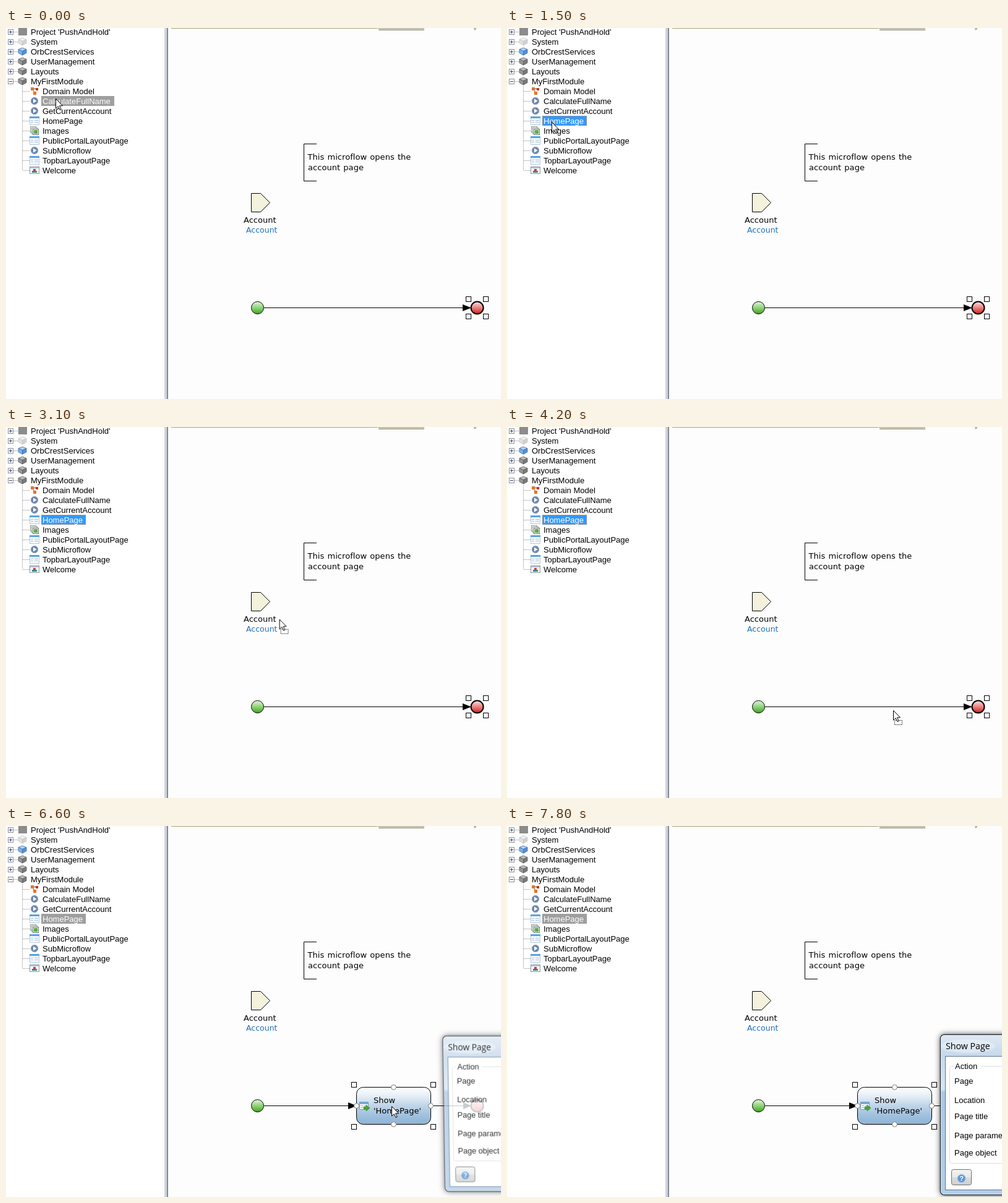
Animation of 800 by 600 pixels, one loop 8000 ms. Source, as an HTML page:

```html
<!DOCTYPE html>
<html lang="en">
<head>
<meta charset="utf-8">
<title>Drag a page into a flow</title>
<style>
html, body { margin: 0; width: 100%; height: 100%; overflow: hidden; background: #fff; }
svg { display: block; width: 800px; height: 600px; }
.tree, .dialog { font: 13px "Liberation Sans", Arial, sans-serif; }
.flow { font: 13px "DejaVu Sans", Verdana, sans-serif; }
.title { font: 14.2px "Open Sans", "Noto Sans", sans-serif; }
.sel text { fill: #fff; }
.dots { stroke: #8c8c8c; stroke-dasharray: 1 1; fill: none; shape-rendering: crispEdges; }
.handle { fill: #fff; stroke: #000; }
.knob { fill: #fff; stroke: #777; }

.sel-old, .sel-on, .sel-off, .before, .after, .marks, .arrow, .ghost, .deny, .dialog, .cursor {
  animation: 8s step-end infinite;
}
.sel-old { animation-name: selOld; }
.sel-on { animation-name: selOn; }
.sel-off, .marks { animation-name: settled; }
.before { animation-name: before; }
.after { animation-name: after; }
.arrow { animation-name: arrow; }
.ghost { animation-name: ghost; }
.deny { animation-name: deny; }
.dialog { animation-name: dialog; transform-origin: 917px 412px; }
.cursor { animation-name: path; }

@keyframes selOld { 0% { opacity: 1 } 10%, 100% { opacity: 0 } }
@keyframes selOn { 0% { opacity: 0 } 10% { opacity: 1 } 62.5%, 100% { opacity: 0 } }
@keyframes settled { 0% { opacity: 0 } 62.5%, 100% { opacity: 1 } }
@keyframes before { 0% { opacity: 1 } 61.25%, 100% { opacity: 0 } }
@keyframes after { 0% { opacity: 0 } 61.25%, 100% { opacity: 1 } }
@keyframes arrow { 0% { opacity: 1 } 25% { opacity: 0 } 33.75% { opacity: 1 } 97.5%, 100% { opacity: 0 } }
@keyframes ghost { 0% { opacity: 0 } 33.75% { opacity: 1 } 61.25%, 100% { opacity: 0 } }
@keyframes deny { 0% { opacity: 0 } 25% { opacity: 1 } 33.75%, 100% { opacity: 0 } }
@keyframes dialog {
  0% { opacity: 0; transform: none }
  81.25% { opacity: .4; transform: matrix(.945, 0, .027, .945, 0, 0) }
  82.5% { opacity: .8; transform: matrix(.97, 0, .015, .97, 0, 0) }
  83.75% { opacity: .95; transform: matrix(.99, 0, .005, .99, 0, 0) }
  85%, 100% { opacity: 1; transform: none }
}
@keyframes path {
  0% { transform: translate(80px, 114px) }
  1.25% { transform: translate(84px, 133px) }
  2.5% { transform: translate(92px, 158px) }
  3.75% { transform: translate(95px, 165px) }
  5% { transform: translate(93px, 152px) }
  13.75% { transform: translate(93px, 152px); animation-timing-function: steps(4, end) }
  18.75% { transform: translate(72px, 152px) }
  25% { transform: translate(56px, 156px) }
  26.25% { transform: translate(31px, 168px) }
  27.5% { transform: translate(44px, 182px) }
  28.75% { transform: translate(88px, 196px); animation-timing-function: steps(5, end) }
  35% { transform: translate(370px, 252px); animation-timing-function: steps(7, end) }
  43.75% { transform: translate(537px, 389px) }
  45% { transform: translate(537px, 389px); animation-timing-function: steps(6, end) }
  52.5% { transform: translate(624px, 458px) }
  56.25% { transform: translate(624px, 453px) }
  68.75% { transform: translate(625px, 453px) }
  70% { transform: translate(623px, 453px) }
  90% { transform: translate(623px, 453px); animation-timing-function: steps(4, end) }
  95%, 100% { transform: translate(753px, 471px) }
}
</style>
</head>
<body>
<svg viewBox="0 0 800 600">
  <defs>
    <linearGradient id="green" x2="0" y2="1">
      <stop offset="0" stop-color="#e2f5da"/><stop offset=".5" stop-color="#8fd37a"/><stop offset="1" stop-color="#3fa31c"/>
    </linearGradient>
    <linearGradient id="red" x2="0" y2="1">
      <stop offset="0" stop-color="#fbe3e3"/><stop offset=".5" stop-color="#ec8080"/><stop offset="1" stop-color="#d21c1c"/>
    </linearGradient>
    <linearGradient id="blue" x2="0" y2="1">
      <stop offset="0" stop-color="#fff"/><stop offset=".25" stop-color="#e4edf6"/>
      <stop offset=".5" stop-color="#bfd4e8"/><stop offset=".75" stop-color="#a1c1de"/><stop offset="1" stop-color="#8db3d5"/>
    </linearGradient>
    <linearGradient id="glass" x2="0" y2="1">
      <stop offset="0" stop-color="#dfe9f3"/><stop offset=".13" stop-color="#c6d9ec"/>
      <stop offset=".34" stop-color="#d6e5f3"/><stop offset=".36" stop-color="#abc8e4"/><stop offset="1" stop-color="#b3cee8"/>
    </linearGradient>
    <linearGradient id="button" x2="0" y2="1">
      <stop offset="0" stop-color="#f3f3f3"/><stop offset=".5" stop-color="#e9e9e9"/>
      <stop offset=".52" stop-color="#dcdcdc"/><stop offset="1" stop-color="#cfcfcf"/>
    </linearGradient>
  </defs>

  <rect width="800" height="600" fill="#fff"/>
  <rect x="262" width="538" height="600" fill="#fdfdfd"/>
  <rect x="256" width="5" height="600" fill="#d0d3de"/>
  <rect x="260" width="2" height="600" fill="#85878e"/>
  <path d="M267 0H600V1H267Z" fill="#a3a17c"/>
  <path d="M600 0H676V4H604Z" fill="#c4c2b0"/>
  <path d="M602 3.5H676" stroke="#a5a392"/>
  <path d="M756 0h4v2l-3 2z" fill="#b7b590"/>

  <g class="tree" id="tree"></g>

  <g class="flow">
    <path d="M502 187.5H481.5V247.5H502" fill="none" stroke="#000"/>
    <g word-spacing="1" letter-spacing=".05">
      <text x="487.5" y="213">This microflow opens the</text><text x="488" y="230">account page</text>
    </g>
    <path d="M396.5 267.5h15l15 15l-15 15h-15z" fill="#f4f2dc" stroke="#000"/>
    <text x="384" y="315">Account</text>
    <text x="388" y="331" font-size="12.5" fill="#1f70b8">Account</text>
    <circle cx="406.5" cy="452.5" r="10" fill="url(#green)" stroke="#000"/>
    <g class="before">
      <path d="M417 452.5H740" stroke="#000"/><path d="M738 447l14 5.5l-14 5.5z"/>
    </g>
    <g class="after">
      <path d="M417 452.5H555M687 452.5H740" stroke="#000"/>
      <path d="M553 447l14 5.5l-14 5.5zM739 447l13 5.5l-13 5.5z"/>
      <rect x="566.5" y="422.5" width="120" height="60" rx="11" fill="url(#blue)" stroke="#000"/>
      <path d="M571.5 446.5h14v12h-14z" fill="#fff" stroke="#7d96ad"/>
      <path d="M572 447h13v3h-13z" fill="#6fb1e6"/>
      <path d="M573 452.5h4m2 0h5M573 455.5h4" stroke="#8fa3b5"/>
      <path d="M578 454h4v-3l6 5l-6 5v-3h-4z" fill="#45a83a" stroke="#2c7d25" stroke-width=".6"/>
      <text x="594" y="448">Show</text><text x="594" y="465">'HomePage'</text>
    </g>
    <circle cx="761.5" cy="452.5" r="10" fill="url(#red)" stroke="#000" stroke-width="2"/>
    <g class="before" id="endMarks"></g>
    <g class="marks" id="stepMarks"></g>
  </g>

  <g class="dialog">
    <rect x="700.5" y="337.5" width="434" height="259" rx="6" fill="url(#glass)" stroke="#1f2a36" stroke-width="1.4"
      style="filter: drop-shadow(0 0 5px rgba(0,0,0,.65))"/>
    <rect x="701.5" y="338.5" width="432" height="257" rx="5" fill="none" stroke="#fff" stroke-opacity=".7"/>
    <ellipse cx="745" cy="356" rx="44" ry="11" fill="#fff" opacity=".3"/>
    <rect x="708.5" y="372.5" width="418" height="216" fill="#fff" stroke="#5f7690"/>
    <rect x="715.5" y="388.5" width="404" height="157" rx="3" fill="none" stroke="#dcdcdc"/>
    <rect x="721" y="380" width="44" height="16" fill="#fff"/>
    <text class="title" x="709" y="361">Show Page</text>
    <g id="labels"></g>
    <rect x="718.5" y="555.5" width="32" height="25" rx="3" fill="url(#button)" stroke="#707070"/>
    <circle cx="734.5" cy="570" r="6.5" fill="#5d97d3" stroke="#a9c4e0"/>
    <text x="734.5" y="574" text-anchor="middle" font-size="11" font-weight="bold" fill="#fff">?</text>
  </g>

  <g class="cursor">
    <g class="ghost">
      <rect x="2" y="16" width="13" height="8" fill="#fff"/>
      <rect x="2.5" y="16.5" width="12" height="7" fill="none" stroke="#000" stroke-dasharray="1 1" stroke-dashoffset=".5" shape-rendering="crispEdges"/>
    </g>
    <path class="arrow" d="M.5 .5V16.2L4.2 12.7L7 18.5L9.2 17.5L6.6 11.8H11.5Z" fill="#fff" stroke="#000"/>
    <g class="deny" fill="none">
      <path d="M-5.5-5.5L5.5 5.5" stroke="#000" stroke-width="3"/>
      <circle r="8" stroke="#000" stroke-width="4"/>
      <circle r="8" stroke="#fff" stroke-width="1.6"/>
      <path d="M-5.5-5.5L5.5 5.5" stroke="#fff" stroke-width="1.4"/>
    </g>
  </g>
</svg>
<script>
const put = (id, html) => { document.getElementById(id).innerHTML = html; };
const label = (x, y, s) => `<text x="${x}" y="${y}">${s}</text>`;
const rect = (x, y, w, h, fill, stroke = 'none') =>
  `<rect x="${x}" y="${y}" width="${w}" height="${h}" fill="${fill}" stroke="${stroke}"/>`;
const line = (d, color) => `<path d="${d}" fill="none" stroke="${color}"/>`;

// Icons are drawn around the vertical centre of their row.
const cube = (top, left, right, edge) => y => `<g transform="translate(26.5 ${y})" stroke="${edge}" stroke-width=".8">
  <path d="M0-6L6.5-3.5L0-.5L-6.5-3.5Z" fill="${top}"/><path d="M-6.5-3.5L0-.5V6L-6.5 2.5Z" fill="${left}"/>
  <path d="M6.5-3.5L0-.5V6L6.5 2.5Z" fill="${right}"/></g>`;
const pale = cube('#f2f2f2', '#e2e2e2', '#d2d2d2', '#c4c4c4');
const azure = cube('#b5d4f5', '#7eb0ea', '#5590d6', '#3b6fb0');
const grey = cube('#c0c0c0', '#989898', '#7a7a7a', '#5c5c5c');
const badge = y => rect(20, y - 6, 14, 12, '#8c8c8c');
const model = y => line(`M43 ${y - 3.5}H49.5M43.5 ${y - 3}L46.5 ${y + 4}`, '#555') +
  rect(40, y - 6, 5, 5, '#e2752a') + rect(48, y - 5, 4, 4, '#c8331f') + rect(44, y + 1, 5, 5, '#e2752a');
const play = y => `<circle cx="46" cy="${y}" r="5.7" fill="#6f87ab" stroke="#93a5bf"/>
  <path d="M44 ${y - 3.5}L49.5 ${y}L44 ${y + 3.5}Z" fill="#fff"/>`;
const page = y => rect(38.5, y - 6.5, 15, 13, '#f6f9fc', '#b5cbe0') + rect(38, y - 7, 16, 3, '#56a4e4') +
  line(`M40 ${y - .5}h4M40 ${y + 2.5}h4M46 ${y - .5}h6M46 ${y + 2.5}h6`, '#a9c0d6');
const images = y => rect(39.5, y - 6.5, 9, 9, '#fff', '#8a958a') + rect(41.5, y - 4.5, 9, 9, '#fff', '#8a958a') +
  rect(43.5, y - 2.5, 9, 9, '#e9f3e6', '#6c7a6c') + rect(45, y - 1, 6, 6, '#61a852');
const blocks = y => rect(38.5, y - 5.5, 15, 11, '#f4f6f8', '#8d99a5') + rect(39, y - 5, 14, 2, '#b8c6d4') +
  rect(44, y - 2, 4, 3, '#d23b2e') + rect(42, y + 1, 4, 3, '#3c78c8') + rect(46, y + 1, 4, 3, '#3f9a45');

const rows = [
  ["Project 'PushAndHold'", badge], ['System', pale], ['OrbCrestServices', azure],
  ['UserManagement', grey], ['Layouts', grey], ['MyFirstModule', grey],
  ['Domain Model', model], ['CalculateFullName', play], ['GetCurrentAccount', play],
  ['HomePage', page], ['Images', images], ['PublicPortalLayoutPage', page],
  ['SubMicroflow', play], ['TopbarLayoutPage', page], ['Welcome', blocks],
];
const TOP = 6;  // rows at the outer level
const rowY = i => 6 + 16 * i;
const toggle = (y, open) => rect(3.5, y - 3.5, 8, 8, '#fff', '#919191') +
  line(`M5 ${y + .5}h5` + (open ? '' : `M7.5 ${y - 2}v5`), '#2d4a86');

const row = ([name, icon], i) => {
  const y = rowY(i), outer = i < TOP;
  const dots = `<path class="dots" d="M${outer ? 12 : 27} ${y + .5}H${outer ? 20 : 38}"/>`;
  return dots + (outer ? toggle(y, i === TOP - 1) : '') + icon(y) + label(outer ? 40 : 59, y + 5, name);
};
const picked = (i, w, fill, cls, edge) =>
  `<g class="sel ${cls}">${rect(57, rowY(i) - 8, w, 16, fill)}` +
  (edge ? `<rect x="57.5" y="${rowY(i) - 7.5}" width="${w - 1}" height="15" fill="none" stroke="#d98a3c" stroke-dasharray="1 1"/>` : '') +
  label(59, rowY(i) + 5, rows[i][0]) + '</g>';

put('tree', `<path class="dots" d="M26.5 94V${rowY(14)}"/>` + rows.map(row).join('') +
  picked(7, 118, '#9f9f9f', 'sel-old') +
  picked(9, 72, '#3399ff', 'sel-on', true) +
  picked(9, 72, '#9f9f9f', 'sel-off'));

const corners = (x1, y1, x2, y2) => [[x1, y1], [x2, y1], [x1, y2], [x2, y2]]
  .map(([x, y]) => `<rect class="handle" x="${x - 3.5}" y="${y - 3.5}" width="8" height="8"/>`).join('');
put('endMarks', corners(747, 438, 775, 466));
put('stepMarks', corners(562, 418, 690, 486) +
  [[626.5, 422.5], [626.5, 482.5], [566.5, 452.5], [686.5, 452.5]]
    .map(([x, y]) => `<circle class="knob" cx="${x}" cy="${y}" r="4"/>`).join(''));

put('labels', label(724, 393, 'Action') +
  [['Page', 417], ['Location', 448], ['Page title', 474], ['Page parameters', 505], ['Page object', 533]]
    .map(([s, y]) => label(723, y, s)).join(''));
</script>
</body>
</html>
```
